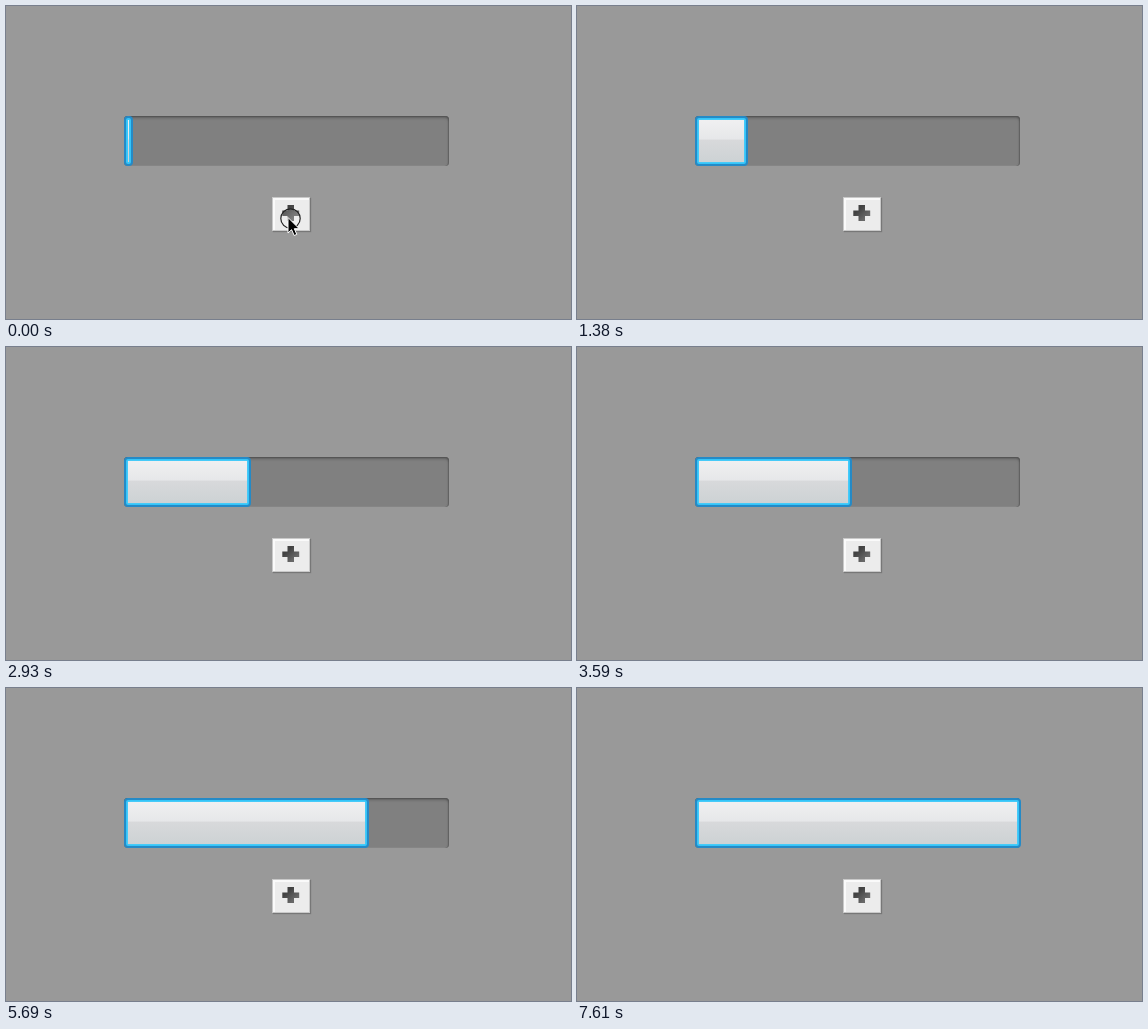
An HTML page that plays this animation: 565x313 px, repeating every 8060 ms.

```html
<!DOCTYPE html>
<html lang="en">
<head>
<meta charset="utf-8">
<title>Progress bar</title>
<style>
  html, body { margin: 0; width: 100%; height: 100%; overflow: hidden; background: #999; }
  .stage { position: relative; width: 565px; height: 313px; overflow: hidden; background: #999; }
  .stage * { position: absolute; box-sizing: border-box; }
  .track {
    left: 118px; top: 110px; width: 325px; height: 50px;
    border-radius: 4px;
    background: #808080;
    box-shadow: inset 0 1px 1px #555, inset 0 2px 3px rgba(0, 0, 0, .25),
      inset -1px 0 1px #6c6c6c, inset 0 -1px 0 #8b8b8b;
  }
  .fill {
    left: 117.5px; top: 110px; height: 49.5px;
    border: 2px solid #258ac6;
    border-radius: 4px;
    background: #34c5f8;
  }
  .gloss {
    inset: 2px;
    background: linear-gradient(#f0f0f1, #e6e7e9 46%, #d8d9db 47%, #cdd2d4);
    box-shadow: 0 0 1px #a5e2f8;
  }
  .button {
    left: 266px; top: 191px; width: 38px; height: 34px;
    background: #ececec;
    border: 1px solid #c9c9c9;
    box-shadow: inset 1px 1px 0 1px #fafafa, 1px 1px 1px #777;
  }
  svg { left: 0; top: 0; }
</style>
</head>
<body>
<div class="stage">
  <div class="track"></div>
  <div class="fill" id="fill"><div class="gloss"></div></div>
  <div class="button"></div>
  <svg width="565" height="313">
    <defs>
      <linearGradient id="ink" x2="1" y2="1">
        <stop offset=".3" stop-color="#424242"/>
        <stop offset=".75" stop-color="#686868"/>
      </linearGradient>
    </defs>
    <path d="M281.5 199h6.5v5.5h5.2v5.5h-5.2v5h-6.5v-5h-5.2v-5.5h5.2z" fill="url(#ink)"/>
    <circle id="ring" cx="284.5" cy="212.5" r="9.7" fill="#fff" fill-opacity=".15" stroke="#222" stroke-width="1.2"/>
    <path id="cursor" d="M0 0V15.5L3.6 12.2 6.2 18 8.8 16.9 6.3 11.2H11.2Z" fill="#000" stroke="#fff" stroke-width="1"/>
  </svg>
</div>
<script>
  const LOOP = 8060, TICK = 60, LAST = 127;
  // [tick, right edge of the fill]
  const edges = [[6, 127], [20, 162.3], [23, 171], [37, 211], [48, 242.3],
    [60, 275], [80, 324.7], [110, 401], [LAST, 444]];
  const [fill, ring, cursor] = ["fill", "ring", "cursor"].map(id => document.getElementById(id));

  function edgeAt(tick) {
    if (tick <= edges[0][0]) return edges[0][1];
    const i = edges.findIndex(([at]) => at >= tick);
    const [t0, x0] = edges[i - 1], [t1, x1] = edges[i];
    return x0 + (x1 - x0) * (tick - t0) / (t1 - t0);
  }

  function draw(now) {
    const t = now % LOOP;
    // one tick is 10 ms short
    const tick = Math.min(LAST, Math.floor((t < 2550 ? t : t + 10) / TICK));
    fill.style.width = edgeAt(tick) - 117.5 + "px";
    ring.style.display = tick < 1 ? "" : "none";

    // the pointer speeds up and leaves through the bottom edge
    const go = Math.max(0, (tick * TICK - 970) / 350) ** 2;
    cursor.style.display = tick < 23 ? "" : "none";
    cursor.setAttribute("transform", `translate(${282 + 106 * go} ${211.5 + 88 * go})`);
    requestAnimationFrame(() => draw(performance.now()));
  }
  draw(0);
</script>
</body>
</html>
```
